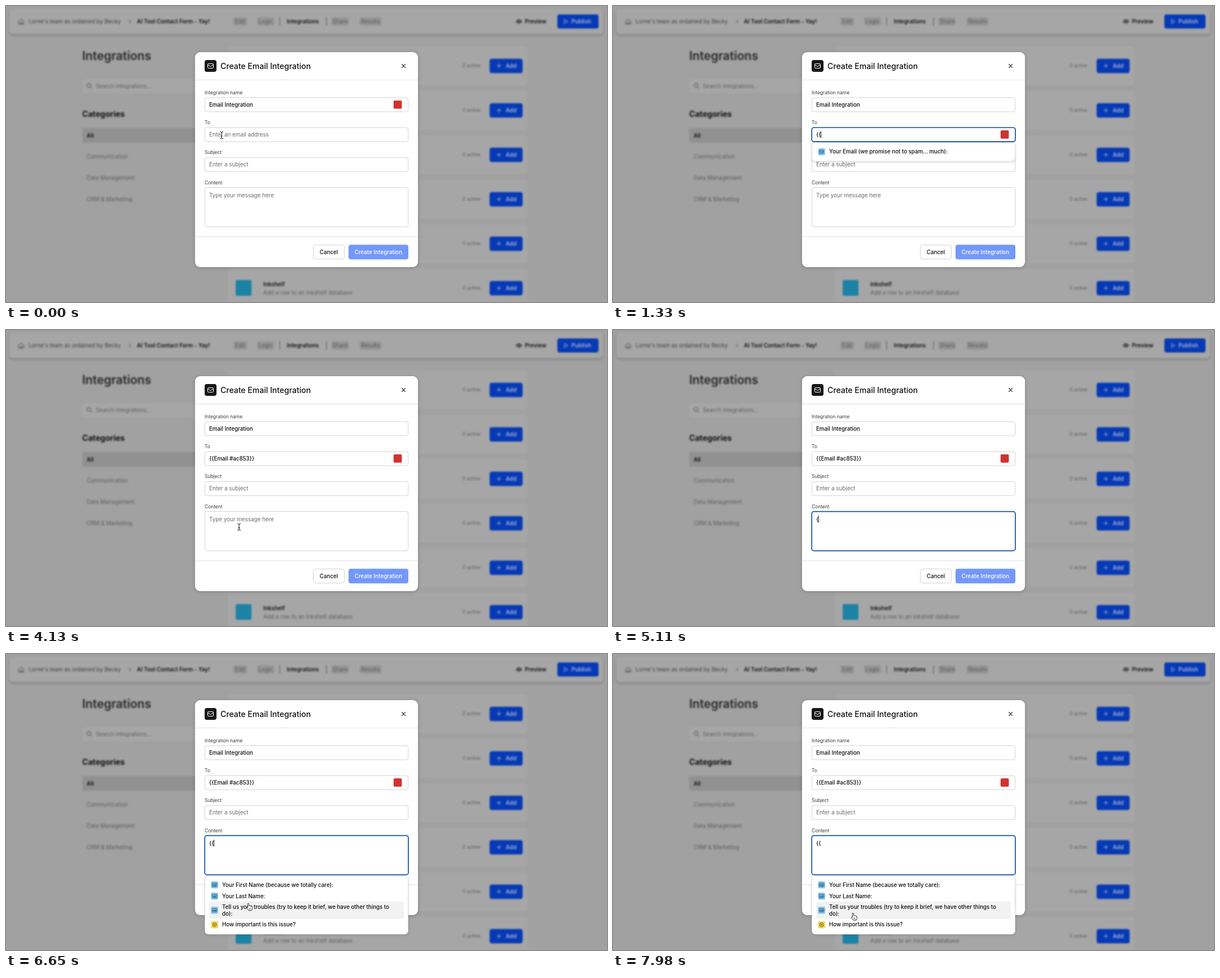
An HTML page for the animation above (8 s loop, 1065 px wide and 526 px high).

```html
<!DOCTYPE html>
<html lang="en">
<head>
<meta charset="utf-8">
<title>Create Email Integration</title>
<style>
  html, body { margin: 0; width: 100%; height: 100%; overflow: hidden; background: #a1a1a1; }
  svg { display: block; width: 1065px; height: 526px; font-family: Inter, sans-serif; }
  text { white-space: pre; }
  .page { filter: blur(1.5px); font-size: 9.84px; fill: #3e3e3e; }
  .page .bold { font-weight: 600; fill: #111; }
  .page .dim { fill: #5c5c5c; }
  .page .blue { fill: #0639b5; }
  .page .on-blue { font-weight: 600; fill: #a9b4d4; }
  .card { fill: #a6a6a6; }
  .label { font-size: 8.43px; fill: #3c3c3c; }
  .field { fill: #fff; stroke: #d3d3d3; }
  .hint { font-size: 9.84px; fill: #6c6c6c; }
  .value { font-size: 9.72px; font-weight: 500; fill: #0c0c0c; }
  .button { font-size: 9.8px; font-weight: 500; }
  .focus { fill: none; stroke: #0f52b5; stroke-width: 1.7; }
  .menu { fill: #fff; stroke: #dadada; stroke-width: .8; filter: drop-shadow(0 1px 2px rgba(0,0,0,.16)); }
  .hover { fill: #f2f2f2; }
  .line { fill: none; stroke-linecap: round; stroke-linejoin: round; }
</style>
</head>
<body>
<svg id="stage" viewBox="0 0 1065 526"></svg>
<script>
const LOOP = 8000, STEP = 70;

const rect = (x, y, w, h, r, attrs = '') =>
  `<rect x="${x}" y="${y}" width="${w}" height="${h}" rx="${r}" ${attrs}/>`;
const text = (x, y, str, cls = '', attrs = '') =>
  `<text x="${x}" y="${y}" class="${cls}" ${attrs}>${str}</text>`;
const line = (d, color, width = 1) =>
  `<path class="line" d="${d}" stroke="${color}" stroke-width="${width}"/>`;
const group = (id, body, attrs = '') => `<g id="${id}" ${attrs}>${body}</g>`;

const envelope = (x, y, w, h, color, width) =>
  rect(x, y, w, h, 1.2, `fill="none" stroke="${color}" stroke-width="${width}"`) +
  line(`M${x} ${y + h * .22}l${w / 2} ${h * .4}l${w / 2} ${-h * .4}`, color, width);

function header() {
  const tabs = [['Edit', 415, 25], ['Logic', 460, 30], ['Share', 592, 31], ['Results', 646, 39]];
  return rect(6, 4, 1052, 46, 6, 'class="card" style="filter:drop-shadow(0 2px 2px rgba(0,0,0,.22))"') +
    line('M22.5 27l4.500-4 4.500 4v5h-9zM26 32v-3h2v3', '#444') +
    text(40, 31, 'Lorne\'s team as ordained by Becky') +
    line('M218.500 25l2.500 2.700-2.500 2.700', '#444') +
    text(232, 31, 'AI Tool Contact Form - Yay!', 'bold') +
    tabs.map(([name, x, w]) =>
      rect(x - w / 2, 20, w, 15, 4, 'fill="#959595"') +
      text(x, 31, name, 'dim', 'text-anchor="middle"')).join('') +
    line('M485 20v15M568 20v15', '#555') +
    text(526, 31, 'Integrations', 'bold', 'text-anchor="middle"') +
    line('M904 27.500q5-6 10 0q-5 6-10 0z', '#222', 1.3) + '<circle cx="909" cy="27.500" r="1.600" fill="#222"/>' +
    text(919.5, 31, 'Preview', 'bold') +
    rect(977, 15, 73, 25, 4, 'class="blue"') +
    line('M990 24l6 3.500-6 3.500z', '#a9b4d4') +
    text(1002, 31, 'Publish', 'on-blue');
}

function sidebar() {
  return text(135, 95.5, 'Integrations', 'bold', 'style="font-size:21.1px;fill:#262626"') +
    rect(135, 130, 230, 25, 4, 'class="card"') +
    '<circle cx="147" cy="141" r="3.500" fill="none" stroke="#444"/>' + line('M149.500 143.500l3 3', '#444') +
    text(159, 145.500, 'Search integrations...', 'dim') +
    text(135, 197, 'Categories', 'bold', 'style="font-size:14.1px;font-weight:700"') +
    rect(135, 217, 230, 26, 4, 'fill="#919191"') +
    text(143, 233.500, 'All', 'bold') +
    ['Communication', 'Data Management', 'CRM &amp; Marketing']
      .map((name, i) => text(143, 271 + 38 * i, name, 'dim')).join('');
}

function cards() {
  let out = '';
  for (let i = 0; i < 6; i++) {
    const y = 106.3 + 79 * i;
    out += rect(393, y - 34.5, 531, 69, 5, 'class="card"') +
      text(809, y + 3, '0 active', 'dim', 'style="font-size:8.43px"') +
      rect(857, y - 12.5, 58.5, 25.5, 4, 'class="blue"') +
      line(`M870 ${y}h7M873.5 ${y - 3.5}v7`, '#a9b4d4') +
      text(885.5, y + 3.5, 'Add', 'on-blue');
  }
  return out + rect(407, 487, 28, 28, 2, 'fill="#1b83a6"') +
    text(456, 497.5, 'Inkshelf', 'bold') +
    text(456, 512.5, 'Add a row to an Inkshelf database', 'dim');
}

function dialog() {
  const field = (y, h = 25) => rect(352.3, y, 360.4, h, 4, 'class="field"');
  const labels = ['Integration name', 'To', 'Subject', 'Content'];
  return rect(335, 82, 395, 382, 9, 'fill="#fff" style="filter:drop-shadow(0 1px 3px rgba(0,0,0,.2))"') +
    rect(352, 96, 21, 21, 4, 'fill="#161616"') + envelope(357.5, 102.5, 10, 8, '#fff', 1) +
    text(380, 111.7, 'Create Email Integration', '', 'font-size="14" font-weight="500" fill="#111"') +
    line('M701.500 103.300l6 6m0-6l-6 6', '#222', 1.2) +
    line('M335 131.500h395M335 410h395', '#dedede') +
    labels.map((name, i) => text(352, 157 + 53.2 * i, name, 'label')).join('') +
    field(162.9) + field(216.1) + field(269.3) + field(322.5, 70) +
    text(360, 178.7, 'Email Integration', 'value') +
    text(360, 285.2, 'Enter a subject', 'hint') +
    rect(544.5, 424.7, 55, 25, 4, 'class="field"') +
    text(572, 440.7, 'Cancel', 'button', 'text-anchor="middle" fill="#111"') +
    rect(607, 424.3, 106, 26, 4, 'fill="#7398fc"') +
    text(660, 440.7, 'Create Integration', 'button', 'text-anchor="middle" fill="#fff"') +
    rect(686.8, 0, 14.6, 14.6, 2, 'id="badge" fill="#d0332f"');
}

const chip = (y, color) => rect(363.3, y - 6, 12.6, 12.6, 2, `fill="${color}"`);
const abIcon = y => chip(y, '#84c8f3') +
  rect(365.6, y - 2.6, 8, 5.8, .8, 'fill="none" stroke="#153a55" stroke-width=".8"') +
  text(369.6, y + 1.9, 'AB', '', 'font-size="4" font-weight="700" fill="#153a55" text-anchor="middle"');
const ringIcon = y => chip(y, '#f3d95c') +
  `<g fill="none" stroke="#5c4a08" stroke-width=".9"><circle cx="369.600" cy="${y + .3}" r="3.500"/><circle cx="369.600" cy="${y + .3}" r="1.200"/></g>`;

// Suggestion rows: top and bottom of each hover area
const ROWS = [[401, 420.3], [420.3, 440], [440, 470.5], [471, 491]];

function toMenu() {
  return rect(352.5, 242.5, 360, 33.5, 6, 'class="menu"') +
    rect(360, 249.3, 345, 19.2, 3, 'id="toHover" class="hover"') +
    chip(258.7, '#84c8f3') + envelope(366.3, 256.3, 6.6, 5.4, '#153a55', .9) +
    text(383, 262.2, 'Your Email (we promise not to spam... much):', 'value');
}

function contentMenu() {
  return rect(352.5, 394, 360, 104, 6, 'class="menu"') +
    rect(360, 0, 345, 0, 3, 'id="rowHover" class="hover"') +
    [410, 430, 455].map(abIcon).join('') + ringIcon(480.8) +
    text(383, 413.7, 'Your First Name (because we totally care):', 'value') +
    text(383, 433.5, 'Your Last Name:', 'value') +
    text(383, 453, 'Tell us your troubles (try to keep it brief, we have other things to', 'value') +
    text(383, 465, 'do):', 'value') +
    text(383, 484.4, 'How important is this issue?', 'value');
}

// Every pointer is drawn around its hot spot at 0,0
const beam = 'M-2.500-6q2.200 0 2.500 1.500q.3-1.500 2.500-1.500M0-4.500v9M-2.500 6q2.200 0 2.500-1.500q.3 1.500 2.500 1.500M-1.300 1.500h2.600';
const pointers =
  group('beam', line(beam, '#fff', 2.2) + line(beam, '#111', 1)) +
  group('hand', '<path d="M-1.300 1.300q0-1.300 1.200-1.300t1.200 1.300v3.200q1.200-.6 2 .3q1.200-.4 1.800.5q1.900-.2 1.900 1.700v2q0 2.200-1.300 3.800h-5q-1.500-1.700-3.300-4.300q-.6-1.300.6-1.500q.6 0 1.200.8z" fill="#fff" stroke="#111" stroke-width=".9" stroke-linejoin="round"/>' +
    line('M1.500 8.500v2.500M3.300 8.500v2.500', '#111', .6)) +
  group('arrow', '<path d="M0 0v10.500l2.500-2.300 1.700 3.900 1.700-.8-1.700-3.700h3.400z" fill="#111" stroke="#fff" stroke-width=".8"/>');

document.getElementById('stage').innerHTML =
  rect(0, 0, 1065, 526, 0, 'fill="#a1a1a1"') +
  group('page', header() + sidebar() + cards(), 'class="page"') +
  dialog() +
  text(360, 232, '', '', 'id="toText"') + text(360, 339.7, '', '', 'id="contentText"') +
  rect(352.2, 216, 360.8, 25.2, 4, 'id="toFocus" class="focus"') +
  rect(352.2, 322.7, 360.8, 69.7, 4, 'id="contentFocus" class="focus"') +
  group('toMenu', toMenu()) + group('contentMenu', contentMenu()) +
  rect(0, 0, .9, 12.4, 0, 'id="caret" fill="#111"') +
  group('pointer', pointers);

const el = id => document.getElementById(id);
const show = (id, on) => { el(id).style.display = on ? '' : 'none'; };
const within = (t, spans) => spans.some(([a, b]) => t >= a && t < b);

const CARET_ON = [[70, 560], [1050, 1890], [2380, 2940], [3430, 3500],
  [4410, 4900], [5040, 5740], [6300, 6790], [7350, 7840]];
const POINTER_HIDDEN = [[1120, 2310], [5040, 5740]];
// time, x, y of the hot spot
const PATH = [
  [0, 382, 229.5], [2310, 384, 232], [2450, 398, 246], [2590, 406.3, 254.3],
  [3850, 406.3, 254.3], [3990, 409, 292], [4130, 413, 350],
  [5670, 413, 350], [6020, 428.3, 391.3], [6300, 430, 415], [6510, 429.5, 433], [6650, 429.5, 443],
  [6930, 428, 465], [7210, 426, 483], [7420, 426, 483], [7700, 425.6, 472], [7980, 425.4, 460.3]
];
const TO_TEXT = [[0, ''], [1120, '{'], [1260, '{{'], [3500, '{{Email #ac853}}']];
const CONTENT_TEXT = [[0, ''], [5040, '{'], [5180, '{{']];

const latest = (list, t) => list.filter(([at]) => at <= t).pop()[1];

function place(t) {
  const i = PATH.findIndex(p => p[0] > t);
  if (i < 0) return PATH[PATH.length - 1].slice(1);
  const a = PATH[i - 1], b = PATH[i], k = (t - a[0]) / (b[0] - a[0]);
  return [a[1] + (b[1] - a[1]) * k, a[2] + (b[2] - a[2]) * k];
}

function write(id, value, hint) {
  const node = el(id);
  node.textContent = value || hint;
  node.setAttribute('class', value ? 'value' : 'hint');
}

function render(now) {
  const t = Math.floor((now % LOOP) / STEP) * STEP;
  const [x, y] = place(t);
  const toValue = latest(TO_TEXT, t), contentValue = latest(CONTENT_TEXT, t);
  const toOpen = t >= 1330 && t < 3500, contentOpen = t >= 5180;
  const visible = !within(t, POINTER_HIDDEN);

  write('toText', toValue, 'Enter an email address');
  write('contentText', contentValue, 'Type your message here');
  el('badge').setAttribute('y', t < 70 ? 167.9 : 221.1);
  show('toFocus', t >= 70 && t < 3500);
  show('contentFocus', t >= 4410);
  show('toMenu', toOpen);
  show('contentMenu', contentOpen);
  show('toHover', visible && y >= 249);

  const row = contentOpen && visible && ROWS.find(([top, end]) => y >= top && y < end);
  show('rowHover', row);
  if (row) {
    el('rowHover').setAttribute('y', row[0]);
    el('rowHover').setAttribute('height', row[1] - row[0]);
  }

  const inContent = t >= 4410, typed = inContent ? contentValue : toValue;
  show('caret', within(t, CARET_ON));
  el('caret').setAttribute('x', 359.8 + 4.1 * typed.length);
  el('caret').setAttribute('y', inContent ? 330 : 222.4);

  const kind = (toOpen && y > 242) || (contentOpen && y > 393) ? 'hand'
    : t >= 3500 && y > 242 && y < 322 && !(y > 269 && y < 295) ? 'arrow' : 'beam';
  ['beam', 'hand', 'arrow'].forEach(id => show(id, id === kind));
  show('pointer', visible);
  el('pointer').setAttribute('transform', `translate(${x} ${y})`);
}

function tick() {
  render(performance.now());
  requestAnimationFrame(tick);
}
tick();
</script>
</body>
</html>
```
